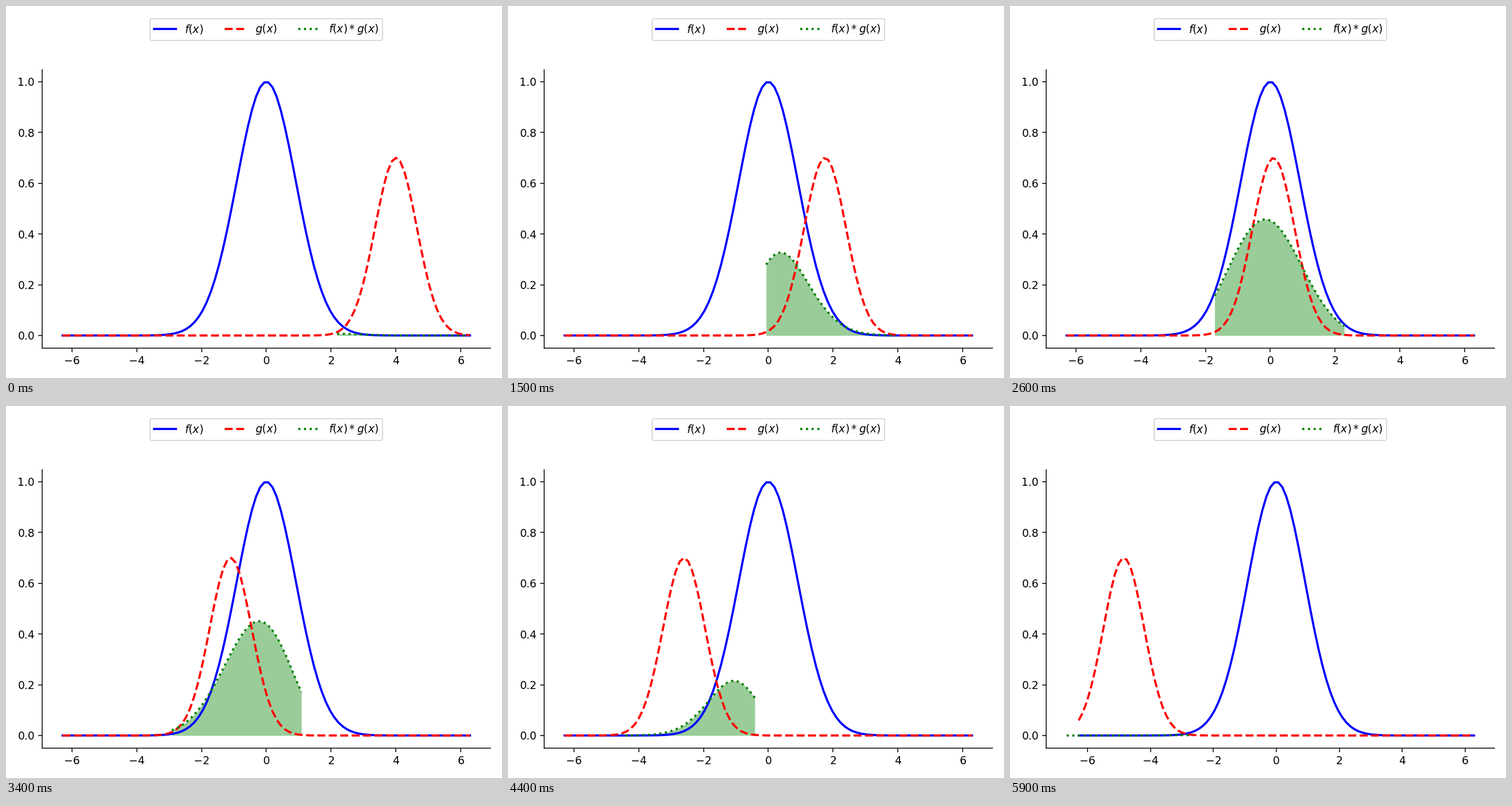
Animation of 864 by 648 pixels, one loop 6000 ms. Source, as a matplotlib script:

```python
import numpy as np
import matplotlib.pyplot as plt
from matplotlib.animation import FuncAnimation

W, H, DPI = 864, 648, 135
FRAMES, INTERVAL = 60, 100
EDGE = 2 * np.pi
SAMPLES = 100
WINDOW = np.linspace(-1.817, 2.183, SAMPLES)  # sliding window around the centre of g


def f(x):
    return np.exp(-0.6 * x**2)


def g(x, centre):
    return 0.7 * np.exp(-1.2 * (x - centre)**2)


def padded(lo, hi, margin=0.05):
    pad = margin * (hi - lo)
    return lo - pad, hi + pad


plt.rcParams["font.family"] = "DejaVu Sans"
fig, ax = plt.subplots(figsize=(W / DPI, H / DPI), dpi=DPI)
fig.subplots_adjust(left=63.2 / W, right=843.75 / W,
                    bottom=1 - 596 / H, top=1 - 111 / H)
ax.spines[["top", "right"]].set_visible(False)

x = np.linspace(-EDGE, EDGE, 100)
ax.plot(x, f(x), color="blue", lw=2, label="$f(x)$")
g_line, = ax.plot([], [], color="red", ls="--", lw=2, label="$g(x)$")
conv_line, = ax.plot([], [], color="green", ls=":", lw=2, label="$f(x)*g(x)$")
area = ax.fill_between([0, 1], [0, 0], color="green", alpha=0.4, lw=0)
ax.set_ylim(*padded(0, f(x).max()))
ax.legend(loc="center", ncol=3, bbox_to_anchor=(453.5 / W, 1 - 40.6 / H),
          bbox_transform=fig.transFigure)


def update(i):
    centre = 4 - 0.15 * i
    t = centre + WINDOW
    conv = np.convolve(f(t), g(t, centre), mode="same") / (SAMPLES / 2)
    g_line.set_data(x, g(x, centre))
    conv_line.set_data(t, conv)
    outline = np.column_stack([t, conv])
    area.set_verts([np.vstack([(t[0], 0), outline, (t[-1], 0)])])
    ax.set_xlim(*padded(min(-EDGE, t[0]), EDGE))
    return g_line, conv_line, area


anim = FuncAnimation(fig, update, frames=FRAMES, interval=INTERVAL,
                     repeat=True, repeat_delay=0, blit=False)
plt.show()
```
